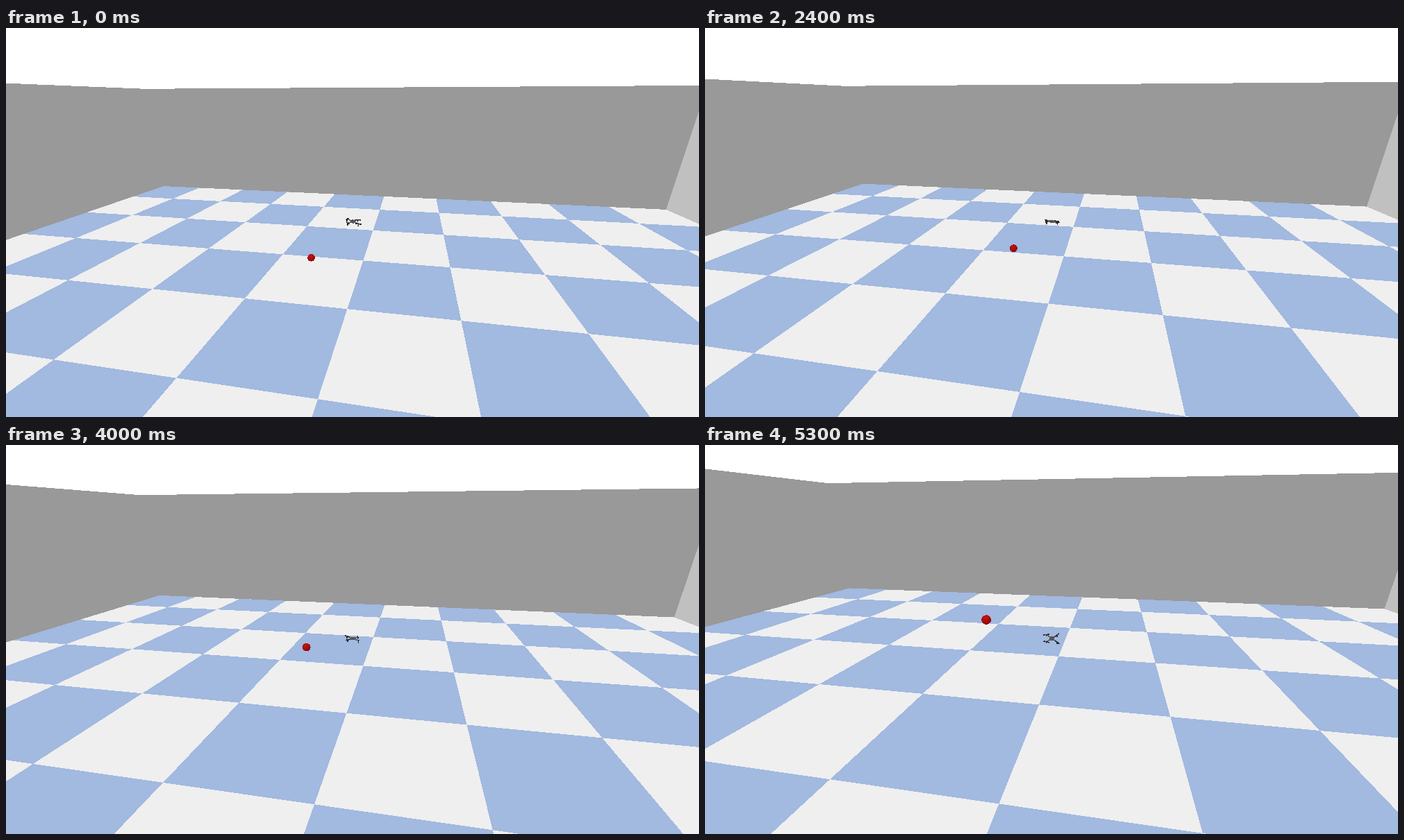
These frames come from a looping animation (998x561 px, 5400 ms). An HTML page:

```html
<!DOCTYPE html>
<html>
<head>
<meta charset="utf-8">
<style>
  html, body { margin: 0; width: 100%; height: 100%; overflow: hidden; background: #fff; }
  svg { display: block; }
</style>
</head>
<body>
<svg width="998" height="561" shape-rendering="crispEdges">
  <radialGradient id="shade" cx="0.4" cy="0.25" r="0.75">
    <stop offset="0" stop-color="#c01810"/>
    <stop offset="0.6" stop-color="#a80c08"/>
    <stop offset="1" stop-color="#840404"/>
  </radialGradient>
  <path id="walls" fill="#999"/>
  <path id="sideWall" fill="#c0c0c0"/>
  <path id="floor" fill="#efefef"/>
  <path id="tiles" fill="#a2b9e0"/>
  <g transform="translate(499.5 279) rotate(6)" fill="none">
    <path id="arms" stroke="#666" stroke-width="2"/>
    <path id="blades" stroke="#2c2c2c" stroke-width="1.6"/>
    <ellipse id="hull" rx="4" fill="#555"/>
  </g>
  <circle id="ball" fill="url(#shade)"/>
</svg>
<script>
const el = id => document.getElementById(id);
const set = (id, attrs) => Object.entries(attrs).forEach(([k, v]) => el(id).setAttribute(k, v));

const W = 998, H = 561, LOOP = 5400, STEP = 100, NEAR = 0.2;
const DEG = Math.PI / 180;
const FOCAL = H / 2 / Math.tan(30 * DEG);
const sinYaw = Math.sin(10 * DEG), cosYaw = Math.cos(10 * DEG);
const sinPitch = Math.sin(20 * DEG), cosPitch = Math.cos(20 * DEG);

// Room in tile units: x to the right, y towards the viewer, z up
const LEFT = 0.13, RIGHT = 9.89, BACK = 0.13, FRONT = 9.87, WALL = 2;
const BALL = [5, 5, 0.997], BALL_RADIUS = 0.02;

let camera;

// The camera follows the drone as it drifts and sinks ever faster
const cameraAt = t => [
  5.501 - 0.0138 * t + 0.0027 * t * t,
  6.569 + t * (0.0259 - t * (0.00417 + 0.002035 * t)),
  1.792 + t * (0.011 - t * (0.01177 + 0.00079 * t))
];

function toView([x, y, z]) {
  const dx = x - camera[0], dy = y - camera[1], dz = z - camera[2];
  const ahead = -dy * cosYaw - dx * sinYaw;
  return [dx * cosYaw - dy * sinYaw, ahead * sinPitch + dz * cosPitch, ahead * cosPitch - dz * sinPitch];
}

const toScreen = ([x, y, depth]) => [W / 2 + FOCAL * x / depth, H / 2 - FOCAL * y / depth];

function clipNear(points) {
  const out = [];
  points.forEach((a, i) => {
    const b = points[(i + 1) % points.length];
    if (a[2] >= NEAR) out.push(a);
    if ((a[2] >= NEAR) !== (b[2] >= NEAR)) {
      const s = (NEAR - a[2]) / (b[2] - a[2]);
      out.push(a.map((v, k) => v + (b[k] - v) * s));
    }
  });
  return out;
}

function polygon(points) {
  const visible = clipNear(points.map(toView)).map(toScreen);
  return visible.length ? `M${visible.join('L')}Z` : '';
}

const wall = (x0, y0, x1, y1) => polygon([[x0, y0, 0], [x1, y1, 0], [x1, y1, WALL], [x0, y0, WALL]]);
const tile = (x0, y0, x1, y1) => polygon([[x0, y0, 0], [x1, y0, 0], [x1, y1, 0], [x0, y1, 0]]);

function drawRoom() {
  let checks = '';
  for (let row = 0; row < 10; row++) {
    for (let col = row % 2; col < 10; col += 2) {
      checks += tile(Math.max(col, LEFT), Math.max(row, BACK),
        Math.min(col + 1, RIGHT), Math.min(row + 1, FRONT));
    }
  }
  set('walls', { d: wall(LEFT, BACK, LEFT, FRONT) + wall(LEFT, BACK, RIGHT, BACK) });
  set('sideWall', { d: wall(RIGHT, BACK, RIGHT, FRONT) });
  set('floor', { d: tile(LEFT, BACK, RIGHT, FRONT) });
  set('tiles', { d: checks });
}

function drawBall() {
  const view = toView(BALL), [cx, cy] = toScreen(view);
  set('ball', { cx, cy, r: BALL_RADIUS * FOCAL / view[2] });
}

// Four rotors on a cross that first tips edge-on, then opens towards the viewer
function drawDrone(t) {
  const tilt = (22 - 14.2 * t + 3.38 * t * t) * DEG;
  const flat = Math.sin(tilt), upright = Math.cos(tilt);
  const point = (radius, angle, z = 0) =>
    [radius * Math.cos(angle), radius * Math.sin(angle) * flat - z * upright];
  let arms = '', blades = '';
  for (let i = 0; i < 4; i++) {
    const angle = (40 + 90 * i) * DEG;
    const [x, y] = point(11, angle);
    const [bx, by] = point(4.5, 20 * t * (i % 2 ? 1 : -1) + i);
    const foot = point(11, angle, -3.5);
    arms += `M0 0L${x} ${y}`;
    blades += `M${x - bx} ${y - by}L${x + bx} ${y + by}M${x} ${y}L${foot}`;
  }
  set('arms', { d: arms });
  set('blades', { d: blades });
  set('hull', { ry: 1.8 + 2 * flat });
}

function draw() {
  const t = Math.floor(performance.now() % LOOP / STEP) * STEP / 1000;
  camera = cameraAt(t);
  drawRoom();
  drawDrone(t);
  drawBall();
  requestAnimationFrame(draw);
}
draw();
</script>
</body>
</html>
```
